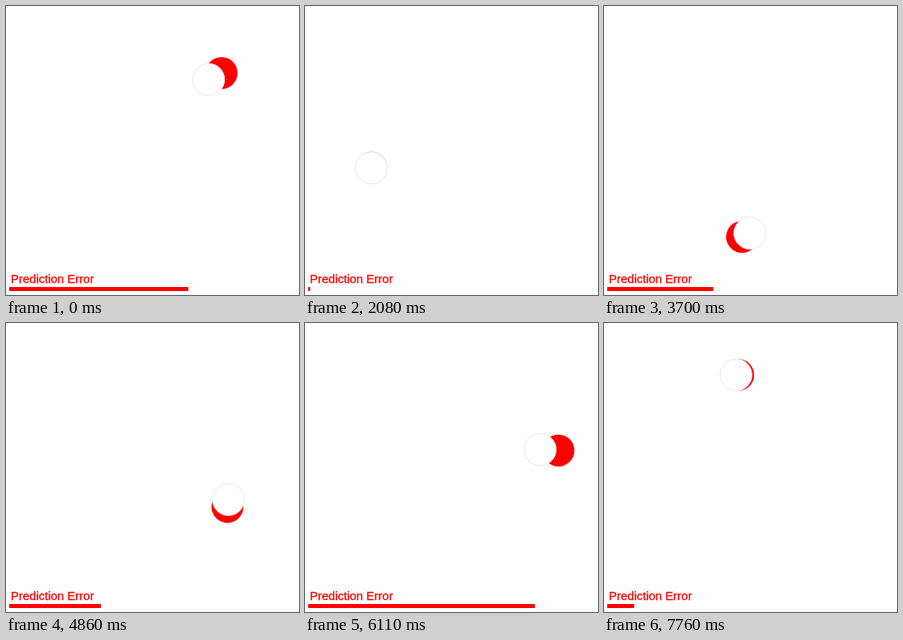
An HTML page with a canvas for the animation above (7.86 s loop, 367 px wide and 362 px high).

```html
<!DOCTYPE html>
<html lang="en">
<head>
<meta charset="utf-8">
<title>Prediction Error</title>
<style>
  html, body { margin: 0; width: 100%; height: 100%; overflow: hidden; background: #fefefe; }
  canvas { display: block; }
</style>
</head>
<body>
<canvas id="stage" width="367" height="362"></canvas>
<script>
const ctx = document.getElementById('stage').getContext('2d');
const RED = '#f00', PAPER = '#fefefe';
const LOOP = 7860, STEPS = 133, RADIUS = 20, BAR_SCALE = 12.4;

// The guess overshoots each turn: it reacts late, peaks, then settles.
const LAG = 0.1, PEAK = 0.74, GAIN = 0.255;

function overshoot(u) {
  const r = Math.max(0, u) / PEAK;
  return (r * Math.exp(1 - r)) ** 2;
}

// Constant speed between two springy walls; the first turn is at wall `near`.
function makeAxis(near, far, speed, spring, firstTurn) {
  const arc = Math.PI / spring;
  const half = Math.abs(near - far) / speed + arc;
  const out = Math.sign(near - far);
  return t => {
    const s = t - firstTurn + arc / 2;
    const n = Math.floor(s / half), u = s - n * half;
    const dir = n % 2 ? -out : out;
    const depth = u < arc ? Math.sin(u * spring) / spring : arc - u;
    let lead = 0;
    for (let i = 0; i <= n; i++) {
      lead += (i % 2 ? out : -out) * overshoot(s - i * half - LAG);
    }
    return {
      pos: (n % 2 ? far : near) + dir * depth * speed,
      lead: lead * speed * GAIN
    };
  };
}

const axisX = makeAxis(313.4, 94.8, 90, 3.55, -0.925);
const axisY = makeAxis(30.9, 277.8, 57, 5, -1.246);

// Start of step k in ms; the pace slows a little after step 84.
function stepTime(k) {
  const ms = k < 84 ? k * 4860 / 84 : 4860 + (k - 84) * 2900 / 49;
  return Math.round(ms / 10) * 10;
}

function disc(x, y, fill) {
  ctx.beginPath();
  ctx.arc(x, y, RADIUS, 0, 2 * Math.PI);
  ctx.fillStyle = fill;
  ctx.fill();
}

function draw(t) {
  const x = axisX(t), y = axisY(t);
  ctx.fillStyle = PAPER;
  ctx.fillRect(0, 0, 367, 362);

  disc(x.pos, y.pos, RED);
  disc(x.pos + x.lead, y.pos + y.lead, PAPER);
  ctx.lineWidth = 1;
  ctx.strokeStyle = '#ebebeb';
  ctx.stroke();

  ctx.fillStyle = ctx.strokeStyle = RED;
  ctx.font = '15px "Liberation Sans", Arial, sans-serif';
  ctx.lineWidth = 0.3;
  ctx.fillText('Prediction Error', 6, 347);
  ctx.strokeText('Prediction Error', 6, 347);
  ctx.fillRect(4, 352, Math.hypot(x.lead, y.lead) * BAR_SCALE, 5);
}

const start = performance.now();
function tick() {
  const ms = (performance.now() - start) % LOOP;
  let k = STEPS;
  while (k > 0 && stepTime(k) > ms) k--;
  draw(stepTime(k) / 1000);
  requestAnimationFrame(tick);
}
tick();
</script>
</body>
</html>
```
